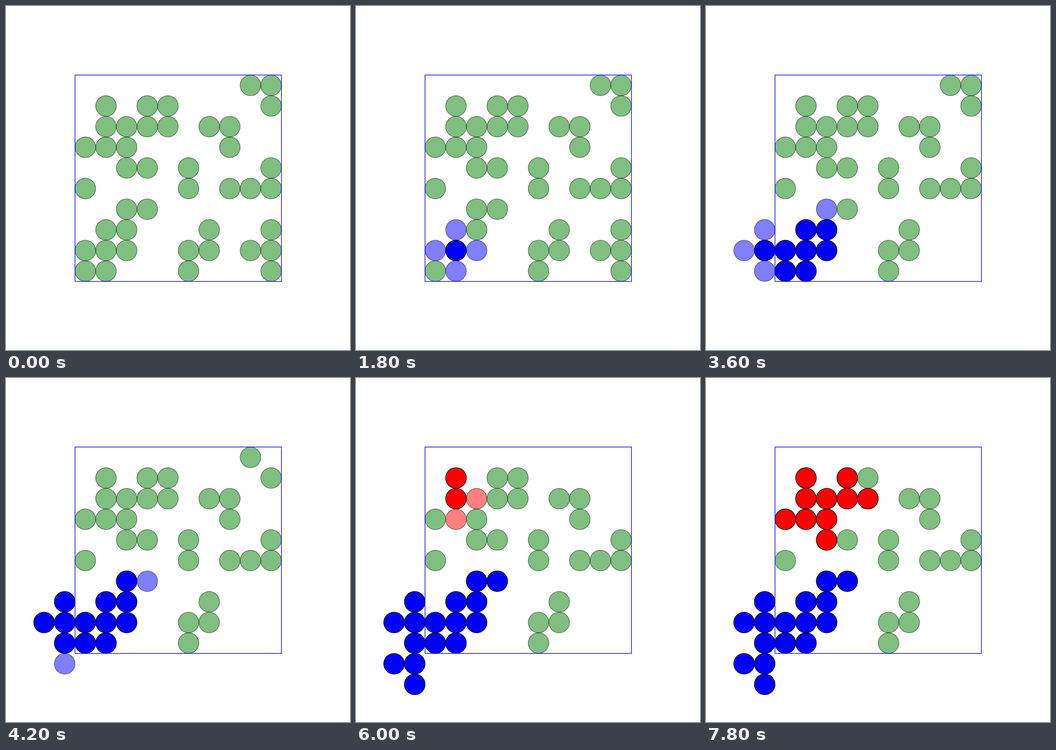
These frames come from a looping animation (748x748 px, 8 s). An HTML page with a canvas:

```html
<!DOCTYPE html>
<html lang="en">
<head>
<meta charset="utf-8">
<title>Periodic clusters</title>
<style>
  html, body { margin: 0; width: 100%; height: 100%; overflow: hidden; background: #fff; }
  canvas { display: block; }
</style>
</head>
<body>
<canvas id="stage" width="748" height="748"></canvas>
<script>
const ctx = document.getElementById('stage').getContext('2d');

const LOOP = 8000, HOLD = 1000, STEP = 200;
const N = 10, LEFT = 150.1, BOTTOM = 598.9, CELL = 44.88;
const DIRECTIONS = [[1, 0], [-1, 0], [0, 1], [0, -1]];

// Occupied sites, top row first.
const rows = [
  '........##',
  '.#.##....#',
  '.####.##..',
  '###....#..',
  '..##.#...#',
  '#....#.###',
  '..##......',
  '.##...#..#',
  '###..##.##',
  '##...#...#'
];

const wrap = v => (v + N) % N;
const siteKey = (x, y) => wrap(y) * N + wrap(x);

const sites = new Map();
rows.forEach((row, r) => [...row].forEach((mark, x) => {
  const y = N - 1 - r;
  if (mark === '#') sites.set(siteKey(x, y), { x, y, shown: Infinity, solid: Infinity });
}));

let step = 0;

// Grow a cluster level by level across the periodic borders:
// one step per new site, then one step to settle the level.
function growCluster(x, y, color) {
  const seed = sites.get(siteKey(x, y));
  step++;
  Object.assign(seed, { cx: x, cy: y, color, shown: step, solid: step });
  let level = [seed];
  while (level.length) {
    const next = [];
    for (const from of level) {
      for (const [dx, dy] of DIRECTIONS) {
        const cx = from.cx + dx, cy = from.cy + dy;
        const site = sites.get(siteKey(cx, cy));
        if (!site || site.color) continue;
        Object.assign(site, { cx, cy, color, shown: ++step });
        next.push(site);
      }
    }
    if (next.length) {
      step++;
      next.forEach(site => { site.solid = step; });
    }
    level = next;
  }
}

growCluster(1, 1, '#00f');
growCluster(1, 8, '#f00');

function drawDisk(x, y, color, alpha) {
  ctx.globalAlpha = alpha;
  ctx.beginPath();
  ctx.arc(LEFT + (x + 0.5) * CELL, BOTTOM - (y + 0.5) * CELL, CELL / 2, 0, Math.PI * 2);
  ctx.fillStyle = color;
  ctx.fill();
  ctx.strokeStyle = '#000';
  ctx.stroke();
}

function draw(time) {
  const now = Math.max(0, Math.floor((time - HOLD) / STEP) + 1);
  ctx.globalAlpha = 1;
  ctx.fillStyle = '#fff';
  ctx.fillRect(0, 0, 748, 748);
  ctx.lineWidth = 1.39;
  for (const s of sites.values()) {
    if (now < s.shown) drawDisk(s.x, s.y, '#008000', 0.5);
    else drawDisk(s.cx, s.cy, s.color, now < s.solid ? 0.5 : 1);
  }
  ctx.globalAlpha = 1;
  ctx.strokeStyle = '#00f';
  ctx.strokeRect(LEFT, BOTTOM - N * CELL, N * CELL, N * CELL);
}

const start = performance.now();
function tick() {
  draw((performance.now() - start) % LOOP);
  requestAnimationFrame(tick);
}
tick();
</script>
</body>
</html>
```
